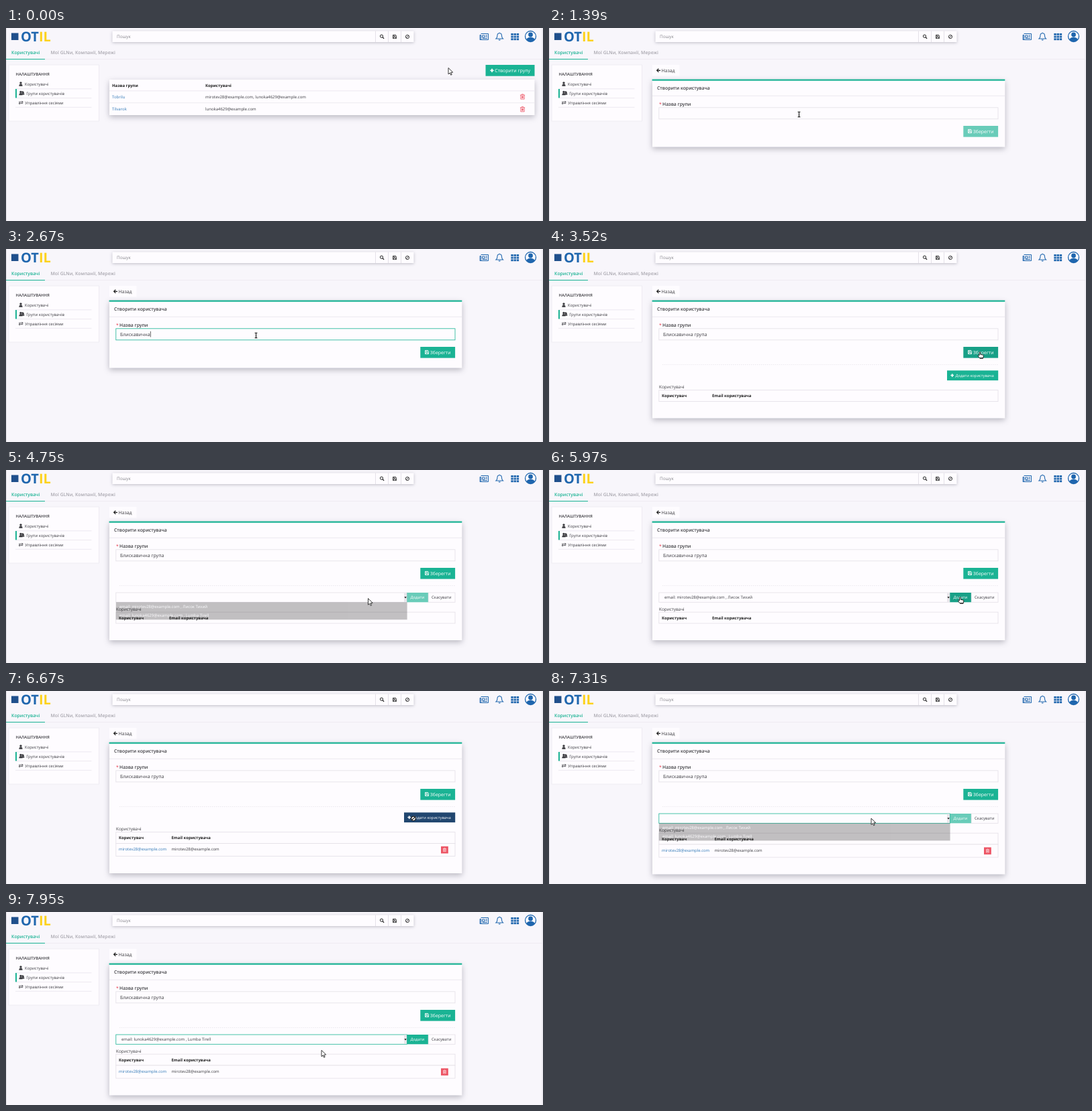
Write an HTML page that moves like this. It is 800 px wide and 288 px high and loops after 8 s.

```html
<!DOCTYPE html>
<html lang="uk">
<head>
<meta charset="utf-8">
<title>Групи користувачів</title>
<style>
html, body { margin: 0; width: 100%; height: 100%; overflow: hidden; background: #f8f6fb; }
svg { display: block; width: 100vw; height: 100vh; }
text { font-family: "Open Sans", "Noto Sans", sans-serif; text-rendering: geometricPrecision; white-space: pre; }
.card { filter: drop-shadow(0 3px 4px rgba(40, 40, 60, .3)); }
</style>
</head>
<body>
<svg id="stage" viewBox="0 0 800 288" xmlns="http://www.w3.org/2000/svg"></svg>
<script>
const LOOP = 8000;
const GREEN = '#1ab394', DARK = '#18a087', NAVY = '#21466f', BLUE = '#1f66ae';
const LINK = '#337ab7', RED = '#ed5565', INK = '#3c3c40', LINE = '#e9e5ec', PAPER = '#fefcff';
const MAIL_A = 'mirotev28@example.com', MAIL_B = 'lunoka4629@example.com';
const OPTIONS = [`email: ${MAIL_A} , Лисок Тихий`, `email: ${MAIL_B} , Lumba Tirell`];
const GROUP = 'Блискавична група';

const text = (x, y, str, size = 6, fill = INK, weight = 400, extra = '') =>
  `<text x="${x}" y="${y}" font-size="${size}" fill="${fill}" font-weight="${weight}" ${extra}>${str}</text>`;
const rect = (x, y, w, h, fill, extra = '') =>
  `<rect x="${x}" y="${y}" width="${w}" height="${h}" fill="${fill}" ${extra}/>`;
const box = (x, y, w, h, id = '') =>
  rect(x, y, w, h, PAPER, `stroke="#e3dfe6" stroke-width=".8" ${id && `id="${id}"`}`);
const path = (d, stroke, width = 1, fill = 'none') =>
  `<path d="${d}" stroke="${stroke}" stroke-width="${width}" fill="${fill}"/>`;
const group = (id, body, extra = '') => `<g id="${id}" ${extra}>${body}</g>`;
const at = (x, y, body) => `<g transform="translate(${x} ${y})">${body}</g>`;

const plus = (x, y, r) => path(`M${x - r} ${y}h${2 * r}M${x} ${y - r}v${2 * r}`, '#fff', r * .65);
const floppy = (x, y, c) => at(x, y,
  path('M-2.6-2.6h4.2l1 1v4.2h-5.2zM-1.5-2.6v1.8h2.4v-1.8M-1.5 2.6v-2h3v2', c, .8));
const ban = (x, y, r, w) => at(x, y,
  `<circle r="${r}" fill="none" stroke="#222" stroke-width="${w}"/>` +
  path(`M${r * .7} ${-r * .7}L${-r * .7} ${r * .7}`, '#222', w));
const trash = (x, y, c, s = 1) => `<g transform="translate(${x} ${y}) scale(${s})">` +
  path('M-3.6-2.4h7.2M-1.3-2.5v-1.1h2.6v1.1M-2.7-2.4v6h5.4v-6M-1-1v3.2M0-1v3.2M1-1v3.2', c, .8) + '</g>';
const person = (x, y, s = 1) => `<g transform="translate(${x} ${y}) scale(${s})" fill="${INK}">
  <circle cy="-1.6" r="1.7"/><path d="M-2.6 3.2q0-3.2 2.6-3.2t2.6 3.2z"/></g>`;

function header() {
  let grid = '';
  for (let i = 0; i < 9; i++) grid += rect(752.3 + i % 3 * 4.2, 8 + Math.floor(i / 3) * 3.7, 3.4, 2.8, BLUE);
  const word = `<text x="22" y="20" font-size="20" font-weight="700" fill="${BLUE}">OT<tspan fill="#fdd21c">IL</tspan></text>`;
  return rect(0, 0, 800, 288, '#f8f6fb') + rect(0, 0, 1, 288, '#dfdce3') + rect(798.6, 0, 1, 288, '#e2dfe6') +
    rect(8, 7.5, 10.5, 10.5, '#20508c') + word +
    `<g style="filter:drop-shadow(0 1.5px 2px rgba(40,40,60,.28))">${rect(158.5, 4.5, 449, 16.5, PAPER)}</g>` +
    path('M550.5 4.5v16.5M569.5 4.5v16.5M588.5 4.5v16.5', '#dedae2', .8) +
    text(165, 15.2, 'Пошук', 6.4, '#85858b') +
    `<circle cx="559.5" cy="12.2" r="2.1" fill="none" stroke="#222"/>` + path('M561.1 13.8l2 2.1', '#222', 1.3) +
    floppy(579, 13, '#222') + ban(598, 13, 2.6, .9) +
    path('M707.5 8.5h11v9h-12.5v-7h1.5v6.5M709.5 11h3.5v3h-3.5zM714.5 11h2.5M714.5 13h2.5M709.5 15.5h7.5', BLUE, 1) +
    path('M730 16q2-1.8 2-5 0-3.3 3.2-3.3t3.2 3.3q0 3.2 2 5zM735.2 7.7v-1M734 17.3q1.2 1.4 2.4 0', BLUE, 1.1) + grid +
    `<circle cx="781.5" cy="12.5" r="8" fill="${PAPER}" stroke="${BLUE}" stroke-width="1.3"/>` +
    `<circle cx="781.5" cy="10" r="3.4" fill="${BLUE}"/><path d="M775.3 17.4q1-3.6 6.2-3.6t6.2 3.6q-2.3 2.9-6.2 2.9t-6.2-2.9z" fill="${BLUE}"/>` +
    rect(0, 46.3, 799, .8, '#ebe7ee') + rect(0, 46, 58, 1, GREEN) +
    text(8, 39, 'Користувачі', 6.85, GREEN, 600) +
    text(66.5, 39, 'Мої GLNи, Компанії, Мережі', 6.85, '#a7a5ad', 600);
}

function sidebar() {
  return rect(4, 55, 134.5, 84, PAPER, 'stroke="#ece8ef" stroke-width=".8"') +
    text(14.5, 71, 'НАЛАШТУВАННЯ', 5.9, INK, 600) +
    path('M14 90.8h113.5M14 104.5h113.5M14 118.3h113.5', LINE, .8) + rect(14, 91, 2, 13.3, GREEN) +
    person(22, 83.5) + text(28, 86, 'Користувачі') +
    person(22, 97) + person(24.8, 97, .8) + person(26, 97.3, .6) + text(30.2, 100, 'Групи користувачів') +
    path('M19 110.4h6.3M19 112.6h6.3M23.6 109l1.7 1.4-1.7 1.2M20.7 111.4l-1.7 1.2 1.7 1.4', INK, .8) +
    text(28.2, 114, 'Управління сесіями');
}

function listPage() {
  return rect(714.5, 55, 73, 16.7, GREEN, 'id="create"') + plus(724, 63.3, 2.6) +
    text(728.3, 65.8, 'Створити групу', 7, '#fff') +
    `<g class="card">${rect(154, 77, 633.5, 53, PAPER)}</g>` +
    path('M154 93.8h633.5M154 111.7h633.5', LINE, .8) +
    text(158, 88, 'Назва групи', 6, '#222', 700) + text(297, 88, 'Користувачі', 6, '#222', 700) +
    text(158, 104.6, 'Tobrilu', 6, LINK) + text(297, 104.6, `${MAIL_A}, ${MAIL_B}`) +
    text(158, 123.2, 'Tilvarok', 6, LINK) + text(297, 123.2, MAIL_B) +
    trash(769.5, 102.5, RED) + trash(769.5, 121.2, RED);
}

function formPage() {
  const table = text(164, 208, 'Користувачі', 6.4) + box(163.8, 210.6, 505.2, 16.8) +
    text(168, 221.2, 'Користувач', 6, '#222', 700) +
    text(243, 221.2, 'Email користувача', 6, '#222', 700, 'id="mailHead"') +
    group('row', box(163.8, 227.4, 505.2, 19.2) + text(168, 238.2, MAIL_A, 6, LINK) +
      text(246.5, 238.2, MAIL_A) + rect(648, 231.8, 10.8, 10.6, RED) + trash(653.4, 237, '#fff', .7));
  const picker = box(163.8, 183, 433.5, 14.3, 'select') + text(172, 192.4, '', 6, INK, 400, 'id="choice"') +
    rect(593, 183.5, 4, 13.3, '#e9e6eb') + `<path d="M593.4 189.2h3.4l-1.7 2.2z" fill="#111"/>` +
    group('addBtn', rect(597.3, 183, 31.7, 14.3, GREEN, 'id="addFill"') + text(602.5, 192.3, 'Додати', 5.9, '#fff')) +
    box(629.2, 183, 39.8, 14.3) + text(634, 192.3, 'Скасувати', 6);
  const popup = rect(163.8, 197.3, 433.8, 26, '#262626') + rect(163.8, 197.3, 433.8, 13, '#505050', 'id="mark"') +
    OPTIONS.map((o, i) => text(169, 206.2 + i * 12.4, o, 6, '#fff')).join('');
  return rect(154, 55, 40.5, 16.5, PAPER) + path('M166 63.3h-5M163.3 60.7l-2.6 2.6 2.6 2.6', '#222', 1.3) +
    text(167.5, 65.8, 'Назад', 6.9) +
    `<g class="card">${rect(154, 77, 525.3, 100, PAPER, 'id="panel"')}</g>` +
    rect(153.6, 76.5, 525.7, 2.2, GREEN) + path('M154 101.2h525', LINE, .8) +
    text(161, 92.3, 'Створити користувача', 6.85, INK, 600) +
    text(164, 116, '*', 6.85, RED, 600) + text(169, 116, 'Назва групи', 6.85, INK, 600) +
    box(163.8, 118.8, 505.2, 17, 'field') + text(170, 129.7, '', 7, INK, 400, 'id="typed"') +
    rect(0, 122.8, .7, 8.6, '#222', 'id="caret"') +
    group('saveBtn', rect(617.3, 146, 51.8, 16.6, GREEN, 'id="saveFill"') + floppy(627, 154, '#fff') +
      text(631.8, 156.5, 'Зберегти', 6.95, '#fff')) +
    group('lower', `<path d="M169 172.6h500" stroke="#e6e2e9" stroke-width=".8" stroke-dasharray="1.5 1.5"/>` +
      group('newUser', rect(593, 181.3, 76.2, 14.8, GREEN, 'id="newFill"') + plus(600.7, 188.6, 2.3) +
        text(605.6, 190.8, 'Додати користувача', 5.8, '#fff')) +
      group('picker', picker) + group('table', table) + group('popup', popup));
}

function cursors() {
  const arrow = path('M0 0v9.4l2.2-1.9 1.5 3.2 1.5-.7-1.5-3.1 3-.3z', '#222', .9, '#fff');
  const hand = path('M-.9 5.3V.8q.8-1.2 1.7 0v3l3.6.8q1.1.3.9 1.6l-.7 3.2h-4.9l-2.6-3.3q0-1.3 1.2-.9z', '#111', .9, '#fff') +
    path('M-.2 9.4h5', '#111', 1.2);
  const beam = path('M-1.9-3.7h1.4l.5.5.5-.5h1.4M0-3.2v6.4M-1.9 3.7h1.4l.5-.5.5.5h1.4', '#111', 1.1);
  const stop = '<circle r="3.3" fill="#fff"/>' + ban(0, 0, 3.2, 1.2);
  return group('pointer', group('arrow', arrow) + group('hand', hand) + group('beam', beam) + group('stop', stop));
}

const stage = document.getElementById('stage');
stage.innerHTML = header() + sidebar() + group('list', listPage()) + group('form', formPage()) + cursors();
const el = {};
stage.querySelectorAll('[id]').forEach(n => el[n.id] = n);

// time, x, y of the pointer's rests and turns
const ROUTE = [
  [50, 659, 59.5], [520, 724, 62.5], [900, 724, 62.5], [1130, 625, 146], [1390, 372.5, 129],
  [2960, 372.5, 129], [3330, 642, 153.5], [3540, 642, 153.5], [3780, 625, 187], [3960, 625, 187],
  [4480, 539.5, 191.7], [4850, 539.5, 191.7], [5150, 515, 203], [5400, 515, 203], [5850, 612.5, 189.5],
  [6200, 612.5, 189.5], [6400, 607, 190.3], [6820, 607, 190.3], [7120, 480, 190], [7330, 480, 190],
  [7600, 470, 206.3]
];
const SHAPES = [
  [0, 'arrow'], [430, 'hand'], [700, 'arrow'], [1090, 'stop'], [1170, 'arrow'], [1330, 'beam'], [3060, 'arrow'],
  [3240, 'hand'], [3610, 'arrow'], [3700, 'hand'], [3960, 'arrow'], [5780, 'hand'], [6200, 'stop'], [6840, 'arrow']
];

const clamp = v => Math.max(0, Math.min(1, v));
const within = (t, a, b) => t >= a && t < b;
const fade = (t, from, to) => Math.min(clamp((t - from) / 220), clamp((to - t) / 90));
const show = (node, on) => node.setAttribute('display', on ? 'inline' : 'none');
const set = (node, name, value) => node.setAttribute(name, value);

function pointerAt(t) {
  const i = ROUTE.findIndex(k => k[0] > t);
  if (i === 0) return ROUTE[0].slice(1);
  if (i < 0) return ROUTE[ROUTE.length - 1].slice(1);
  const [t0, x0, y0] = ROUTE[i - 1], [t1, x1, y1] = ROUTE[i];
  const u = (t - t0) / (t1 - t0), e = u * u * (3 - 2 * u);
  return [x0 + (x1 - x0) * e, y0 + (y1 - y0) * e];
}

function render(t) {
  const form = t >= 700, saved = t >= 3450, row = t >= 6150;
  const picking = within(t, 3960, 6150) || t >= 6820;
  const chars = Math.max(0, Math.min(GROUP.length, Math.floor((t - 2130) / 50) + 1));
  const option = within(t, 5330, 6150) ? 0 : t >= 7720 ? 1 : -1;
  const typing = within(t, 1550, 3390);

  show(el.list, !form);
  show(el.form, form);
  set(el.create, 'fill', within(t, 430, 700) ? DARK : GREEN);

  set(el.panel, 'height', !saved ? 100.5 : 175.5 + (row ? 19.5 : 0) + (picking ? 1.5 : 0));
  el.typed.textContent = GROUP.slice(0, chars);
  set(el.field, 'stroke', typing ? GREEN : '#e3dfe6');
  show(el.caret, typing && (within(t, 2130, 2980) || Math.floor((t - 1550) / 500) % 2 === 0));
  if (typing) set(el.caret, 'x', 170.3 + (chars ? el.typed.getComputedTextLength() : 0));
  set(el.saveBtn, 'opacity', chars ? 1 : .65);
  set(el.saveFill, 'fill', within(t, 3240, 3610) ? DARK : GREEN);

  show(el.lower, saved);
  show(el.newUser, !picking);
  set(el.newFill, 'fill', within(t, 3700, 3960) || within(t, 6200, 6820) ? NAVY : GREEN);
  show(el.picker, picking);
  set(el.table, 'transform', `translate(0 ${picking ? 1.5 : 0})`);
  show(el.row, row);
  set(el.mailHead, 'x', row ? 246.5 : 243);

  el.choice.textContent = OPTIONS[option] || '';
  set(el.select, 'stroke', within(t, 5330, 5920) || t >= 7250 ? GREEN : '#e3dfe6');
  set(el.addBtn, 'opacity', option < 0 ? .65 : 1);
  set(el.addFill, 'fill', within(t, 5780, 6150) ? DARK : GREEN);

  const open = Math.max(fade(t, 4690, 5420), fade(t, 7250, 7810));
  show(el.popup, open > 0);
  set(el.popup, 'opacity', open);
  const [x, y] = pointerAt(t);
  show(el.mark, y > 197);
  set(el.mark, 'y', t > 7000 ? 210.3 : 197.3);

  set(el.pointer, 'transform', `translate(${x} ${y})`);
  const shape = SHAPES.filter(s => s[0] <= t).pop()[1];
  for (const name of ['arrow', 'hand', 'beam', 'stop']) show(el[name], name === shape);
}

const start = performance.now();
function tick() {
  render((performance.now() - start) % LOOP);
  requestAnimationFrame(tick);
}
tick();
</script>
</body>
</html>
```
